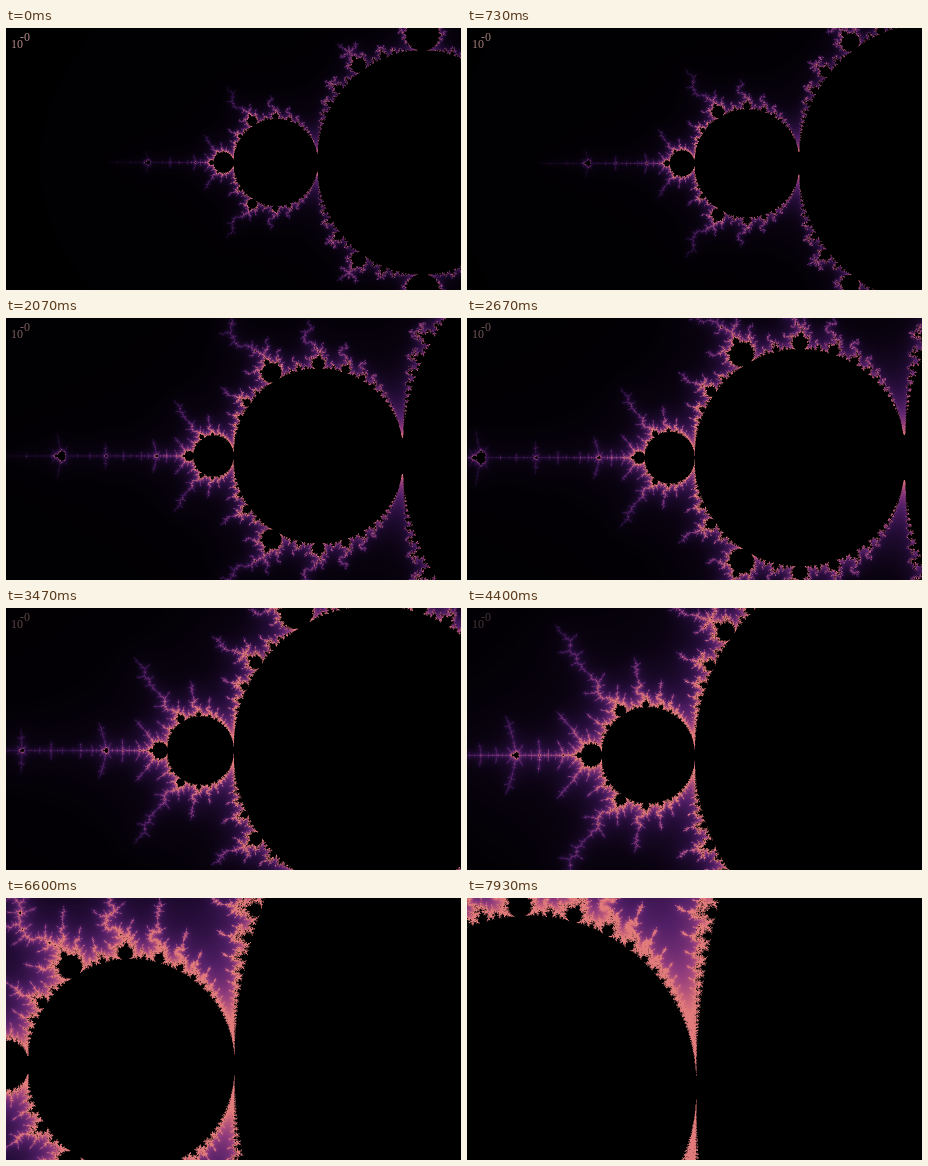
Write an HTML page with a canvas that moves like this. It is 455 px wide and 262 px high and loops after 8000 ms.

```html
<!DOCTYPE html>
<html lang="en">
<head>
<meta charset="utf-8">
<title>Mandelbrot zoom</title>
<style>
html, body { margin: 0; width: 100%; height: 100%; overflow: hidden; background: #000; }
canvas, svg { position: absolute; left: 0; top: 0; width: 455px; height: 262px; }
text { font: 12px "Liberation Serif", "Times New Roman", serif; fill: #b48c88; }
</style>
</head>
<body>
<canvas id="view" width="455" height="262"></canvas>
<svg viewBox="0 0 455 262">
  <g id="label"><text x="5" y="20">10</text><text x="14" y="13">-0</text></g>
</svg>
<script>
const W = 455, H = 262, LOOP = 8000, STEP = LOOP / 120;
const CENTER = { re: -1.25066, im: 0.02012 };
const ASPECT = (16 / 9) / (W / H);
const SUB = [0.25, 0.75];
const FULL = 60; // escape count that reaches the brightest colour
const STOPS = [
  [0, 0, 0, 0], [0.1, 2, 0, 4], [0.18, 10, 3, 17], [0.3, 38, 13, 58], [0.45, 82, 31, 102],
  [0.65, 145, 60, 125], [0.85, 200, 98, 122], [1, 225, 122, 122]
];

const ctx = document.getElementById('view').getContext('2d');
const label = document.getElementById('label');
const image = ctx.createImageData(W, H);

const palette = Array.from({ length: 512 }, (_, i) => {
  const v = i / 511;
  const k = Math.max(1, STOPS.findIndex(s => s[0] >= v));
  const a = STOPS[k - 1], b = STOPS[k];
  const f = (v - a[0]) / (b[0] - a[0]);
  return [1, 2, 3].map(j => a[j] + (b[j] - a[j]) * f);
});

// Pixels per unit; the zoom picks up speed during the first few steps.
function scaleAt(n) {
  return 168 * Math.exp(0.0241 * (n - 1.9 * (1 - Math.exp(-n / 1.9))));
}

// Iteration limit: deeper close to the zoom centre.
function limit(dx, dy) {
  const r2 = dx * dx + dy * dy;
  return r2 > 0.25 ? FULL : Math.min(400, FULL * (0.25 / r2) ** 0.3);
}

function inBulbs(x, y) {
  const yy = y * y, p = x - 0.25, q = p * p + yy;
  return q * (q + p) <= 0.25 * yy
    || (x + 1) ** 2 + yy <= 0.0625
    || (x + 1.3107) ** 2 + yy < 0.003;
}

// Smooth escape count, or 0 for points that stay bounded.
function escape(dx, dy) {
  const cx = CENTER.re + dx, cy = CENTER.im + dy;
  if (inBulbs(cx, cy)) return 0;
  const max = limit(dx, dy);
  let x = 0, y = 0, xx = 0, yy = 0, ox = 0, oy = 0, mark = 8;
  for (let n = 1; n <= max; n++) {
    y = 2 * x * y + cy;
    x = xx - yy + cx;
    xx = x * x;
    yy = y * y;
    if (xx + yy > 64) return n + 1 - Math.log2(Math.log2(xx + yy) / 2);
    if (Math.abs(x - ox) + Math.abs(y - oy) < 1e-9) return 0;
    if (n === mark) { ox = x; oy = y; mark *= 2; }
  }
  return 0;
}

function draw(n) {
  const s = scaleAt(n), sy = s * ASPECT;
  const data = image.data;
  for (let py = 0, i = 0; py < H; py++) {
    for (let px = 0; px < W; px++, i += 4) {
      let r = 0, g = 0, b = 0;
      for (const v of SUB) for (const u of SUB) {
        const e = escape((px + u - W / 2) / s, (H / 2 - py - v) / sy);
        if (e <= 0) continue;
        const c = palette[Math.min(511, e / FULL * 511 | 0)];
        r += c[0]; g += c[1]; b += c[2];
      }
      data[i] = r / 4;
      data[i + 1] = g / 4;
      data[i + 2] = b / 4;
      data[i + 3] = 255;
    }
  }
  ctx.putImageData(image, 0, 0);
  label.setAttribute('opacity', Math.max(0, 1 - n / 105));
}

const start = performance.now();
let shown = -1;
function tick() {
  const t = (performance.now() - start) % LOOP;
  const n = Math.floor((t + 5) / STEP) % 120;
  if (n !== shown) draw(shown = n);
  requestAnimationFrame(tick);
}
tick();
</script>
</body>
</html>
```
